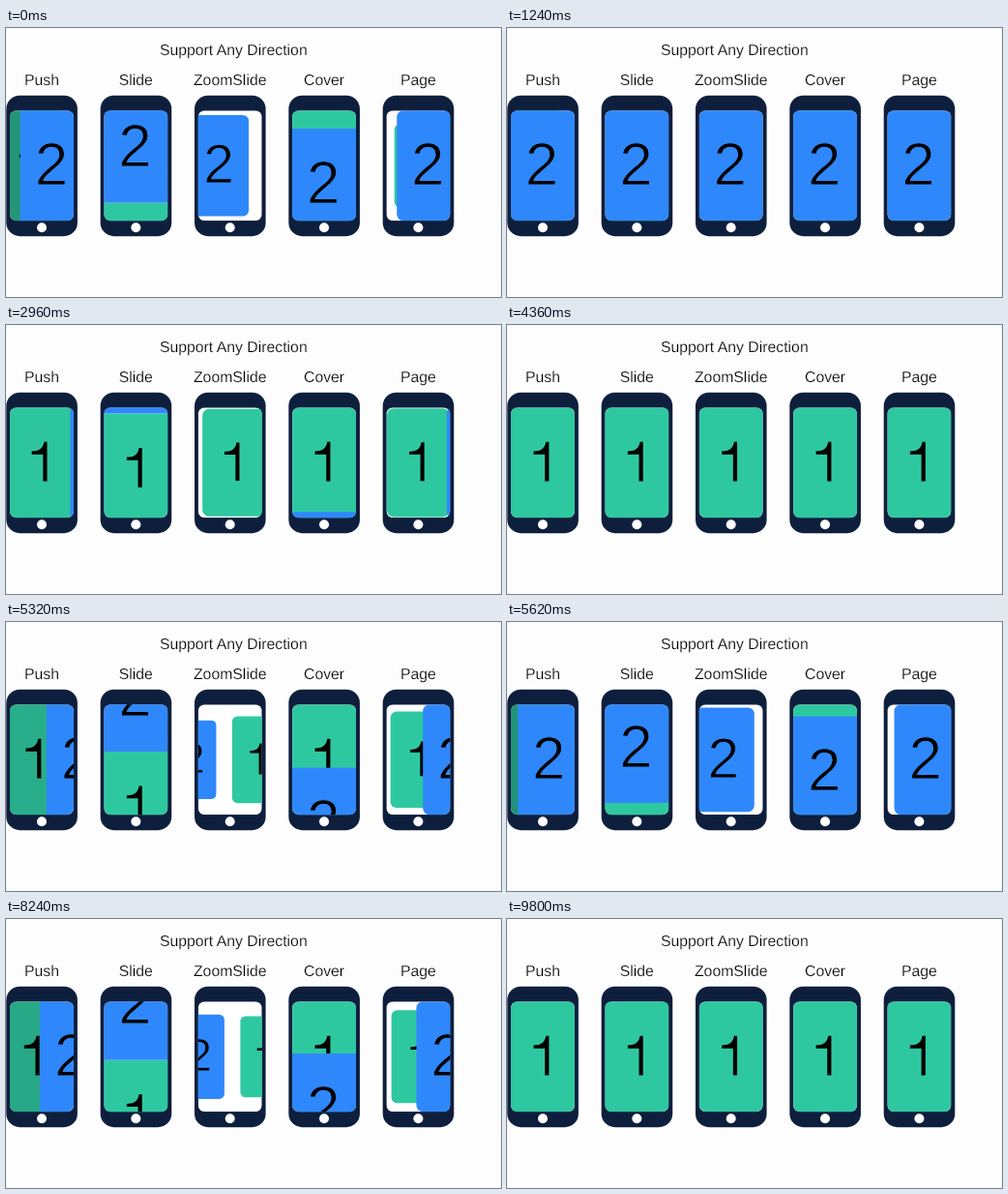
These frames come from a looping animation (512x278 px, 9820 ms). An HTML page:

```html
<!DOCTYPE html>
<html lang="en">
<head>
<meta charset="utf-8">
<title>Support Any Direction</title>
<style>
html, body { margin: 0; width: 100%; height: 100%; overflow: hidden; background: #fdfdfd; }
svg { display: block; width: 100vw; height: 100vh; }
text { font-family: "Liberation Sans", Arial, sans-serif; text-anchor: middle; text-rendering: geometricPrecision; }
.label { font-size: 15.8px; fill: #000; stroke: #fdfdfd; stroke-width: 0.25; }
.digit { font-size: 62px; stroke-width: 1.1; }
</style>
</head>
<body>
<svg id="stage" viewBox="0 0 512 278">
  <defs>
    <clipPath id="screen"><rect x="4" y="85.3" width="66" height="114" rx="7"/></clipPath>
  </defs>
  <rect width="512" height="278" fill="#fdfdfd"/>
  <text class="label" x="235.3" y="28.3">Support Any Direction</text>
</svg>
<script>
const LOOP = 9820, DURATION = 900;
const STARTS = [-660, 2195, 4913, 7808]; // alternately to card 2 and back to card 1
const W = 66, H = 114, CX = 37, CY = 142.3, STEP = 97.35;
const GREEN = "#2ec8a0", BLUE = "#2f88fb";
const ONE = "M3.2 -21.5H6.4V19.3H2.2V-8.6H-9.5V-11.8C-3 -12 2 -13.5 3.2 -21.5Z"; // a 1 without a foot

// Each pose gives [x, y, scale] for card 1 and card 2; p is how far card 2 is in.
const styles = [
  { name: "Push", dim: 0.3, pose: p => [[-W / 4 * p, 0, 1], [W * (1 - p), 0, 1]] },
  { name: "Slide", pose: p => [[0, H * p, 1], [0, -H * (1 - p), 1]] },
  { name: "ZoomSlide", round: 7,
    pose: p => [[W * p, 0, 1 - p / 2], [-W * (1 - p), 0, (1 + p) / 2]] },
  { name: "Cover", pose: p => [[0, 0, 1], [0, H * (1 - p), 1]] },
  { name: "Page", round: 7, pose: p => [[0, 0, 1 - 0.3 * p], [W * (1 - p), 0, 1]] }
];

const stage = document.getElementById("stage");

function add(parent, tag, attrs, text) {
  const node = document.createElementNS("http://www.w3.org/2000/svg", tag);
  for (const key in attrs) node.setAttribute(key, attrs[key]);
  if (text) node.textContent = text;
  return parent.appendChild(node);
}

function addCard(parent, color, round, addDigit) {
  const g = add(parent, "g", {});
  const box = { x: -W / 2, y: -H / 2, width: W, height: H, rx: round };
  add(g, "rect", { ...box, fill: color });
  addDigit(g, color);
  const shade = add(g, "rect", { ...box, fill: "#000", opacity: 0 });
  return { g, shade };
}

const addOne = g => add(g, "path", { d: ONE });
const addTwo = (g, color) =>
  add(g, "text", { class: "digit", x: -0.9, y: 19.8, stroke: color }, "2");

const phones = styles.map((style, i) => {
  const g = add(stage, "g", { transform: `translate(${i * STEP} 0)` });
  add(g, "text", { class: "label", x: CX, y: 58.5 }, style.name);
  add(g, "rect", { x: 0.3, y: 69.7, width: 73.6, height: 145.5, rx: 14, fill: "#0e1f3d" });
  add(g, "circle", { cx: CX, cy: 206.3, r: 5, fill: "#fff" });
  const view = add(g, "g", { "clip-path": "url(#screen)" });
  add(view, "rect", { x: 4, y: 85.3, width: W, height: H, fill: "#fff" });
  const { round = 0 } = style;
  const cards = [addCard(view, GREEN, round, addOne), addCard(view, BLUE, round, addTwo)];
  return { style, cards };
});

function progress(t) {
  let p = 0;
  STARTS.forEach((start, i) => {
    if (t < start) return;
    const u = Math.min((t - start) / DURATION, 1);
    const e = (1 - Math.cos(Math.PI * u)) / 2;
    p = i % 2 ? 1 - e : e;
  });
  return p;
}

function draw(t) {
  const p = progress(t);
  for (const { style, cards } of phones) {
    style.pose(p).forEach(([x, y, s], i) =>
      cards[i].g.setAttribute("transform", `translate(${CX + x} ${CY + y}) scale(${s})`));
    if (style.dim) cards[0].shade.setAttribute("opacity", style.dim * p);
  }
}

const begin = performance.now();
function tick() {
  draw((performance.now() - begin) % LOOP);
  requestAnimationFrame(tick);
}
tick();
</script>
</body>
</html>
```
